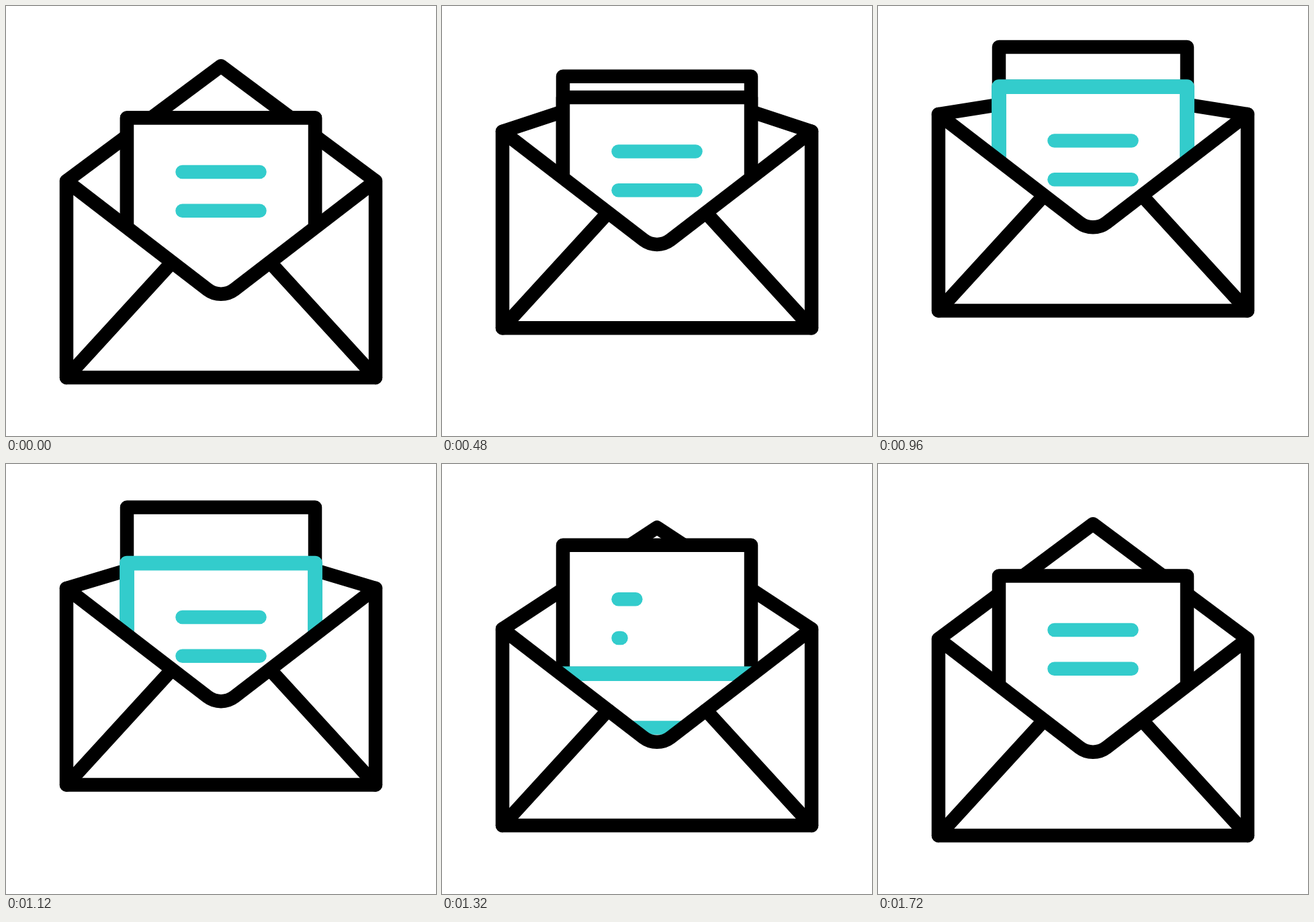
An HTML page with a canvas that plays this animation: 640x640 px, repeating every 2000 ms.

```html
<!DOCTYPE html>
<html lang="en">
<head>
<meta charset="utf-8">
<title>Open envelope</title>
<style>
  html, body { margin: 0; height: 100%; overflow: hidden; background: #fff; }
  canvas { display: block; width: 100vw; height: 100vh; }
</style>
</head>
<body>
<canvas id="stage" width="640" height="640"></canvas>
<script>
const ctx = document.getElementById('stage').getContext('2d');
const LOOP = 2000, STEP = 40;
const BLACK = '#000', TEAL = '#33cccc', WHITE = '#fff';
const WEIGHT = 20.5;
const LEFT = 180, RIGHT = 460, LETTER_TOP = 166.5, LETTER_HEIGHT = 200;
const ENVELOPE_TOP = 260.5, ENVELOPE_BOTTOM = 553;

// cubic-bezier(.55, 0, .2, 1), solved by bisection
function ease(x) {
  if (x <= 0) return 0;
  if (x >= 1) return 1;
  let low = 0, high = 1, s = 0.5;
  for (let i = 0; i < 24; i++) {
    s = (low + high) / 2;
    const r = 1 - s;
    if (1.65 * s * r * r + 0.6 * r * s * s + s * s * s < x) low = s;
    else high = s;
  }
  return s * s * (3 - 2 * s);
}

const progress = (t, start, duration) => ease((t - start) / duration);

function stroke(color = BLACK, width = WEIGHT) {
  ctx.strokeStyle = color;
  ctx.lineWidth = width;
  ctx.stroke();
}

function trace(points) {
  ctx.beginPath();
  for (const [x, y] of points) ctx.lineTo(x, y);
}

function drawFlap(base, apex) {
  trace([[90, base], [320, apex], [550, base]]);
  stroke();
}

function drawTextLine(y, amount) {
  if (amount <= 0) return;
  trace([[262.5, y], [262.5 + 115 * amount, y]]);
  stroke(TEAL);
}

function drawLetter(shift, tint, firstLine, secondLine) {
  const top = LETTER_TOP + shift, bottom = top + LETTER_HEIGHT;
  trace([[LEFT, bottom], [LEFT, top], [RIGHT, top], [RIGHT, bottom]]);
  ctx.fillStyle = WHITE;
  ctx.fill();
  stroke();
  if (tint > 0) {
    const length = 2 * LETTER_HEIGHT + RIGHT - LEFT;
    if (tint < 1) ctx.setLineDash([tint * length, 2 * length]);
    stroke(TEAL, 21.8);
    ctx.setLineDash([]);
  }
  drawTextLine(247 + shift, firstLine);
  drawTextLine(304.7 + shift, secondLine);
}

function drawFront(shift) {
  ctx.save();
  ctx.translate(0, shift);
  ctx.beginPath();
  ctx.moveTo(90, ENVELOPE_TOP);
  ctx.lineTo(300, 422);
  ctx.bezierCurveTo(311.8, 431, 328.2, 431, 340, 422);
  ctx.lineTo(550, ENVELOPE_TOP);
  ctx.lineTo(550, ENVELOPE_BOTTOM);
  ctx.lineTo(90, ENVELOPE_BOTTOM);
  ctx.closePath();
  ctx.fillStyle = WHITE;
  ctx.fill();
  stroke();
  trace([[90, ENVELOPE_BOTTOM], [247, 381.5]]);
  stroke();
  trace([[550, ENVELOPE_BOTTOM], [393, 381.5]]);
  stroke();
  ctx.restore();
}

function draw(t) {
  const drop = progress(t, 880, 743);
  const envelope = -101 * (progress(t, 153, 652) - drop);
  const flapHeight = 171.3 - 137 * (progress(t, 187, 606) - drop);
  const backLetter = -105.5 * (progress(t, 170, 711) - progress(t, 1011, 721));
  const frontLetter = -47.5 * progress(t, 186, 643) + 340 * progress(t, 910, 955);
  const tint = progress(t, 447, 520);

  ctx.fillStyle = WHITE;
  ctx.fillRect(0, 0, 640, 640);
  ctx.lineCap = ctx.lineJoin = 'round';

  const base = ENVELOPE_TOP + envelope;
  drawFlap(base, base - flapHeight);

  ctx.save();
  ctx.beginPath();
  ctx.rect(0, 0, 640, ENVELOPE_BOTTOM + envelope);
  ctx.clip();
  drawLetter(backLetter, 0, progress(t, 1180, 450), progress(t, 1251, 450));
  // Once the sunken letter is out of sight, only the new one remains
  if (t < 1720) drawLetter(frontLetter, tint, 1, 1);
  ctx.restore();

  drawFront(envelope);
}

const started = performance.now();

function tick() {
  const elapsed = (performance.now() - started) % LOOP;
  draw(Math.floor(elapsed / STEP) * STEP);
  requestAnimationFrame(tick);
}

tick();
</script>
</body>
</html>
```
